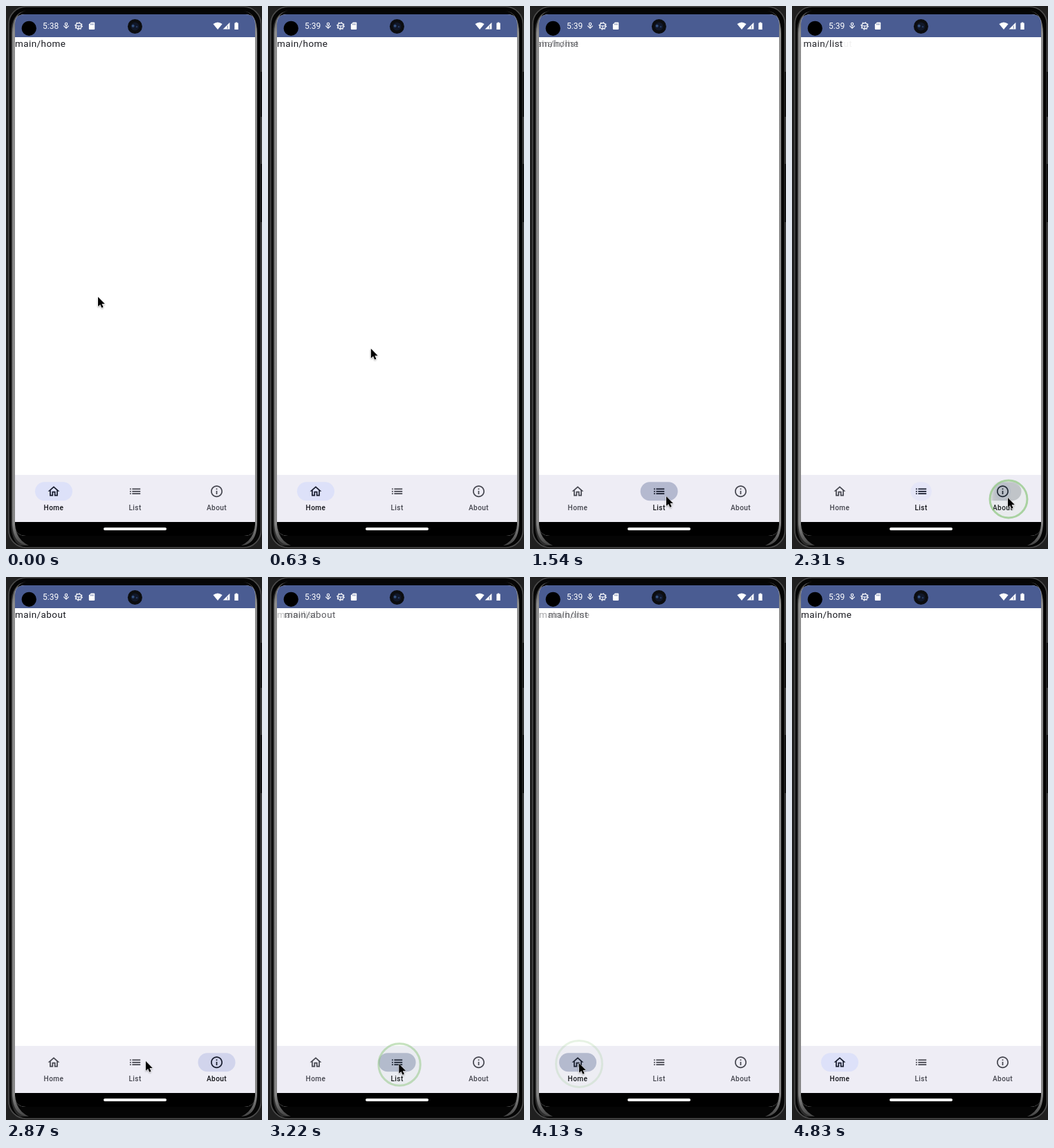
These frames come from a looping animation (370 px wide and 784 px high, 4.97 s). An HTML page:

```html
<!DOCTYPE html>
<html lang="en">
<head>
<meta charset="utf-8">
<title>Bottom navigation</title>
<style>
  html, body { margin: 0; width: 100%; height: 100%; overflow: hidden; background: #1d1d1d; }
  svg { display: block; width: 370px; height: 784px; }
  text { font-family: Roboto, "Noto Sans", sans-serif; }
  .page { font-size: 13.5px; letter-spacing: .42px; fill: #1a1b21; }
  .label { font-size: 10.1px; font-weight: 500; letter-spacing: .42px; text-anchor: middle; }
  .clock { font-size: 12px; fill: #fff; }
</style>
</head>
<body>
<svg viewBox="0 0 370 784">
  <defs>
    <clipPath id="screen"><path d="M13 26Q13 12 27 12H346Q360 12 360 26V749Q360 765 344 765H29Q13 765 13 749Z"/></clipPath>
    <clipPath id="pillClip"><rect x="-27" y="-13.5" width="54" height="27" rx="13.5"/></clipPath>
    <filter id="soft" x="-30%" y="-30%" width="160%" height="160%"><feGaussianBlur stdDeviation="2"/></filter>
    <filter id="shade" x="-50%" y="-50%" width="200%" height="200%">
      <feDropShadow dx="0" dy="1.2" stdDeviation="1" flood-opacity=".35"/>
    </filter>
    <linearGradient id="edge" x1="0" x2="0" y1="0" y2="1">
      <stop offset="0" stop-color="#555"/><stop offset=".04" stop-color="#8c8c8c"/>
      <stop offset=".96" stop-color="#858585"/><stop offset="1" stop-color="#444"/>
    </linearGradient>
  </defs>

  <!-- device body -->
  <rect width="370" height="784" fill="#202020"/>
  <rect x="4" y="1" width="364.5" height="781" rx="25" fill="#050505" stroke="#4c4c4c" stroke-width="1.6"/>
  <path d="M30 6Q11 8 11 40V744Q11 776 32 779H20Q7 772 7 744V40Q7 10 30 6Z" fill="#2c2c2c"/>
  <path d="M29 7Q13 10 13 30V748Q14 770 33 779Q9 778 9 744V40Q9 9 29 7Z" fill="url(#edge)"/>
  <path d="M343 7Q360 10 360 30V748Q359 770 340 779Q363 778 363 744V40Q363 9 343 7Z" fill="url(#edge)"/>
  <path d="M369.2 95V160M369.2 228V312" stroke="#080808" stroke-width="1.6"/>

  <g clip-path="url(#screen)">
    <rect x="13" y="12" width="347" height="753" fill="#fff"/>
    <rect x="13" y="12" width="347" height="33" fill="#4a5c92"/>
    <g id="pages"></g>
    <rect x="13" y="677" width="347" height="68" fill="#eeedf5"/>
    <rect x="13" y="745" width="347" height="20" fill="#000"/>
    <rect x="141" y="753" width="91" height="4" rx="2" fill="#fff"/>
  </g>

  <!-- status bar -->
  <text class="clock" id="clock" x="53" y="33">5:38</text>
  <g fill="none" stroke="#fff" stroke-width="1.1">
    <circle cx="87" cy="26" r="1.7"/>
    <path d="M83.4 28.5L87 32.3L90.6 28.5M87 28V31"/>
    <circle cx="105" cy="28.8" r="4.2" stroke-width="1.4"/>
    <circle cx="105" cy="28.8" r="5.3" stroke-dasharray="1.5 2.66"/>
    <path d="M101 28.8H109M105 28.8V33"/>
  </g>
  <path d="M122.8 23.6H127.2Q128.2 23.6 128.2 24.6V33Q128.2 34 127.2 34H120.8Q119.8 34 119.8 33V26.6Z" fill="#fff"/>
  <path d="M122.6 25.4V27.4M124.4 25.4V27.4M126.2 25.4V27.4" stroke="#4a5c92" stroke-width=".8"/>
  <g fill="#fff">
    <path d="M299.4 26Q306 20.8 312.6 26L306 34Z"/>
    <path d="M323.4 23.8V33.6H313.6Z"/>
    <path d="M330.3 24.6H331.7V23.5H334.3V24.6H335.7V34H330.3Z"/>
  </g>
  <path d="M320.2 28.4V32.6" stroke="#4a5c92" stroke-width=".8"/>
  <circle cx="33.3" cy="32.3" r="10.6" fill="#000"/>
  <circle cx="186.4" cy="29.5" r="10.5" fill="#0c0d10"/>
  <circle cx="186.4" cy="29.5" r="6" fill="#11182a"/>
  <circle cx="183.6" cy="28.8" r="2" fill="#33507e"/>
  <circle cx="189" cy="30" r="1.3" fill="#27395f"/>

  <g id="tabs"></g>
  <circle id="ring" fill="#a9d49b" fill-opacity=".1" stroke="#93c985" stroke-width="3"/>
  <path id="cursor" d="M0 0V13.8L3.2 10.9L5.3 15.8L7.6 14.8L5.5 10H9.8Z"
    fill="#000" stroke="#fff" stroke-width="1" paint-order="stroke" filter="url(#shade)"/>
</svg>
<script>
const LOOP = 4970, STEP = 70;
const NAV_MS = 500, PILL_MS = 160;
const $ = id => document.getElementById(id);

const tabs = [
  { name: 'Home', x: 69, icon: 'M12 5.69l5 4.5V18h-2v-6H9v6H7v-7.81l5-4.5M12 3L2 12h3v8h6v-6h2v6h6v-8h3L12 3z' },
  { name: 'List', x: 186.6, icon: 'M3 13h2v-2H3v2zm0 4h2v-2H3v2zm0-8h2V7H3v2zm4 4h14v-2H7v2zm0 4h14v-2H7v2zM7 7v2h14V7H7z' },
  { name: 'About', x: 304.5, icon: 'M11 7h2v2h-2zm0 4h2v6h-2zm1-9C6.48 2 2 6.48 2 12s4.48 10 10 10 10-4.48 10-10S17.52 2 12 2zm0 18c-4.41 0-8-3.59-8-8s3.59-8 8-8 8 3.59 8 8-3.59 8-8 8z' }
];

// press and selection times, tab change, slide direction of the leaving page
const taps = [
  { down: 1120, at: 1300, from: 0, to: 1, dir: -1, x: 194.5, y: 709 },
  { down: 2100, at: 2240, from: 1, to: 2, dir: 1, x: 313, y: 712 },
  { down: 2940, at: 3045, from: 2, to: 1, dir: 1, x: 190, y: 704 },
  { down: 3780, at: 3920, from: 1, to: 0, dir: 1, x: 71, y: 703 }
];

// time, x, y
const path = [
  [0, 133, 420], [420, 133, 420], [1050, 194, 708], [1400, 194, 708], [1540, 197, 708],
  [1700, 197, 708], [2080, 312, 710], [2450, 312, 710], [2870, 202, 699], [2960, 190, 703],
  [3200, 190, 703], [3640, 71, 702], [LOOP, 71, 702]
];

const clamp = v => Math.max(0, Math.min(1, v));
const smooth = v => v * v * (3 - 2 * v);
const set = (el, attrs) => { for (const k in attrs) el.setAttribute(k, attrs[k]); };

for (const tab of tabs) {
  $('tabs').insertAdjacentHTML('beforeend', `
    <g transform="translate(${tab.x} 700.8)">
      <rect y="-13.5" height="27" rx="13.5" fill="#dde1f9"/>
      <g clip-path="url(#pillClip)"><circle fill="#161b2c" filter="url(#soft)"/></g>
      <path d="${tab.icon}" transform="scale(.845) translate(-12 -12)"/>
      <text class="label" y="27.4">${tab.name}</text>
    </g>`);
  const g = $('tabs').lastElementChild;
  [tab.pill, tab.ripple, tab.glyph, tab.label] = g.querySelectorAll('rect, circle, path, text');
  $('pages').insertAdjacentHTML('beforeend', `<text class="page" y="59">main/${tab.name.toLowerCase()}</text>`);
  tab.page = $('pages').lastElementChild;
}

function cursorAt(t) {
  let i = 1;
  while (i < path.length - 1 && path[i][0] <= t) i++;
  const [a, b] = [path[i - 1], path[i]];
  const p = smooth(clamp((t - a[0]) / (b[0] - a[0])));
  return [a[1] + (b[1] - a[1]) * p, a[2] + (b[2] - a[2]) * p];
}

function drawTab(tab, i, t, nav) {
  let shown = i === 0 ? 1 : 0, on = shown, shift = 0;
  if (nav) {
    const age = t - nav.at, p = clamp(age / NAV_MS), q = clamp(age / PILL_MS);
    shown = i === nav.to ? smooth(p) : i === nav.from ? 1 - smooth(p) : 0;
    on = i === nav.to ? q : i === nav.from ? 1 - q : 0;
    if (i === nav.from) shift = nav.dir * 40 * p ** 1.25;
  }
  set(tab.page, { x: 13 + shift, opacity: shown });
  set(tab.pill, { x: -27 * on, width: 54 * on, opacity: on });
  const active = on > .3;
  tab.glyph.setAttribute('fill', active ? '#161b2c' : '#45464f');
  tab.label.setAttribute('fill', active ? '#111217' : '#45464f');

  const pressed = nav && nav.to === i, age = pressed ? t - nav.at : 0;
  set(tab.ripple, pressed
    ? { cx: nav.x - tab.x, cy: nav.y - 704, r: 15 + .14 * age, opacity: .2 * clamp((770 - age) / 470) }
    : { r: 0, opacity: 0 });
}

function draw(t) {
  $('clock').textContent = t < 490 ? '5:38' : '5:39';
  const nav = taps.filter(k => k.at <= t).pop();
  tabs.forEach((tab, i) => drawTab(tab, i, t, nav));

  const tap = taps.find(k => t >= k.down && t < k.down + 400);
  if (tap) {
    const age = t - tap.down;
    const alpha = Math.min(.75, .38 + age * .0018) * clamp((400 - age) / 170);
    set($('ring'), { cx: tap.x, cy: tap.y, r: 17.3 + .046 * age, opacity: alpha });
  } else {
    $('ring').setAttribute('opacity', 0);
  }
  const [x, y] = cursorAt(t);
  set($('cursor'), { transform: `translate(${x} ${y})`, opacity: t < 4480 ? 1 : 0 });
}

const start = performance.now();
function tick() {
  const t = (performance.now() - start) % LOOP;
  draw(Math.floor(t / STEP) * STEP);
  requestAnimationFrame(tick);
}
tick();
</script>
</body>
</html>
```
